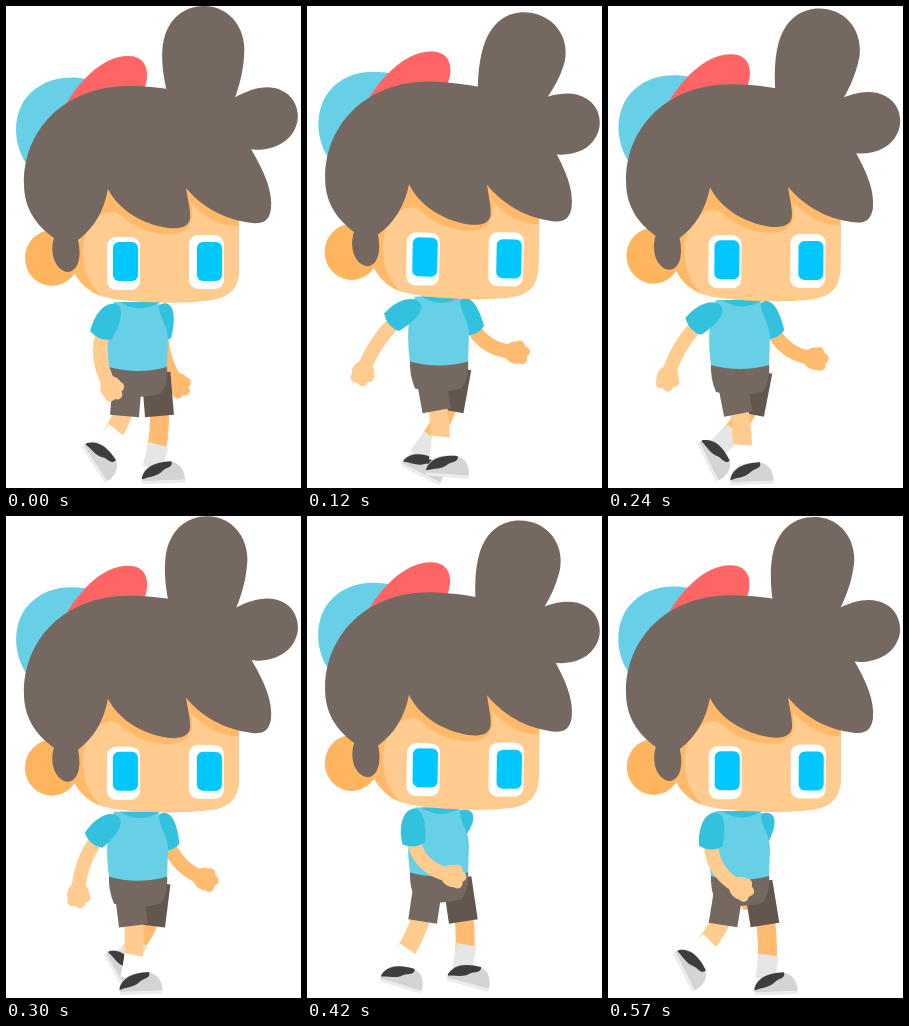
These frames come from a looping animation (295x482 px, 0.6 s). An HTML page with a canvas:

```html
<!DOCTYPE html>
<html lang="en">
<head>
<meta charset="utf-8">
<title>Walk cycle</title>
<style>
  html, body { margin: 0; width: 100%; height: 100%; overflow: hidden; background: #fff; }
  canvas { display: block; }
</style>
</head>
<body>
<canvas id="stage" width="295" height="482"></canvas>
<script>
const ctx = document.getElementById('stage').getContext('2d');
const LOOP = 600, STEPS = 15, RAD = Math.PI / 180;

const HAIR = '#756860', FAR_CLOTH = '#63564f', BLUE = '#67d0e6', TEAL = '#33c1e0';
const SKIN = '#ffcb8e', FAR_SKIN = '#ffbc70', EAR = '#ffb55e';

const shapes = Object.fromEntries(Object.entries({
  cap: 'M22 160C8 142 5 112 20 92C36 72 60 69 82 73L62 120Z',
  brim: 'M55 107C70 78 95 50 122 50C142 50 144 68 138 84L100 110Z',
  face: 'M66 225L100 172L185 170L233 200L233 262C233 280 226 291 205 294C180 298 120 298 92 289C66 277 58 250 66 225Z',
  glow: 'M77 246C77 224 90 206 106 206C116 206 122 222 150 227C178 232 190 222 185 197C200 213 216 221 233 220L233 262C233 280 226 291 205 294C180 297 120 298 95 290C82 278 77 262 77 246Z',
  hair: 'M48 232C28 218 18 200 18 178C17 125 58 79 125 80C160 80 200 90 228 95C236 115 240 130 245 143C258 165 267 185 265 203C263 216 256 218 246 217C218 214 195 200 180 182C182 195 185 205 184 213C182 222 172 223 162 222C135 218 112 203 102 183C98 205 88 222 72 234C76 252 72 265 62 266C50 265 43 248 48 232Z',
  bun: 'M166 105C159 82 155 62 156 44C158 14 177 0 198 0C220 0 237 18 238 42C238 62 234 78 226 100L215 125L180 125Z',
  lobe: 'M215 125L228 92C245 82 262 78 275 84C290 90 295 108 290 120C284 138 262 146 243 143L215 132Z',
  shirt: 'M108 296L153 296C152 312 162 318 162 334L161 361Q132 369 103 361C100 340 100 315 108 296Z',
  collar: 'M114 296L154 296Q134 309 114 296Z',
  shorts: 'M103 358L161 358C162 372 160 382 154 388Q132 394 108 388Q102 374 103 358Z',
  sleeve: 'M-13 23C-16 6 -11 -11 1 -12C11 -11 12 6 10 22Q0 29 -13 23Z',
  shoe: 'M-12 17C-12 2 0 -2 16 -2C27 -1 31 8 31 17Z',
  trim: 'M-12 13C-9 4 0 -2 18 -2C20 4 13 4 9 7C3 13 -4 12 -12 15Z',
  sole: 'M-12 17L31 17L31 20L-12 20Z'
}).map(([name, d]) => [name, new Path2D(d)]));

function fill(name, color) {
  ctx.fillStyle = color;
  ctx.fill(shapes[name]);
}

function curve(color, width, cap, x, y, cx, cy, ex, ey) {
  ctx.strokeStyle = color;
  ctx.lineWidth = width;
  ctx.lineCap = cap;
  ctx.beginPath();
  ctx.moveTo(x, y);
  ctx.quadraticCurveTo(cx, cy, ex, ey);
  ctx.stroke();
}

const line = (color, width, x, y, ex, ey) => curve(color, width, 'butt', x, y, x, y, ex, ey);

function disc(color, x, y, rx, ry = rx) {
  ctx.fillStyle = color;
  ctx.beginPath();
  ctx.ellipse(x, y, rx, ry, 0, 0, 7);
  ctx.fill();
}

function box(color, x, y, w, h, r) {
  ctx.fillStyle = color;
  ctx.beginPath();
  ctx.roundRect(x, y, w, h, r);
  ctx.fill();
}

// Runs draw() in a frame moved to (x, y) and turned by the angle
function at(x, y, angle, draw) {
  ctx.save();
  ctx.translate(x, y);
  ctx.rotate(angle);
  draw();
  ctx.restore();
}

const turnAbout = (x, y, angle, draw) => at(x, y, angle, () => { ctx.translate(-x, -y); draw(); });

// Cosine that peaks at the given step, so many times per loop
const wave = (step, peak, times = 1) => Math.cos(2 * Math.PI * times * (step - peak) / STEPS);

// The angle is in degrees, forward from hanging straight down
function arm(shoulder, y, angle, bend, skin) {
  const x = shoulder + angle * .05, sin = Math.sin(angle * RAD), cos = Math.cos(angle * RAD);
  const reach = 73 - .15 * angle, sag = bend + .13 * angle;
  const hx = x + reach * sin, hy = y + reach * cos;
  const ex = x + reach / 2 * sin - sag * cos, ey = y + reach / 2 * cos + sag * sin;
  curve(skin, 14, 'round', x, y, 2 * ex - (x + hx) / 2, 2 * ey - (y + hy) / 2, hx, hy);
  at(hx, hy, Math.atan2(hy - ey, hx - ex), () => {
    disc(skin, 0, 0, 12, 11);
    disc(skin, 8, -4, 5);
    disc(skin, 8, 4, 5);
    disc(skin, 1, -8, 5);
  });
  at(x, y, Math.atan2(x - ex, ey - y) + 6 * RAD, () => fill('sleeve', TEAL));
}

function leg(hip, y, step, skin, sock, cloth) {
  const stride = wave(step, 4.6);
  const hx = hip + 10 * stride, hy = y + 43;
  const ax = hip - 13 + 30 * stride, ay = 449 + 10 * wave(step, 6.4);
  const turn = Math.max(-2, 16 + 48 * wave(step, 13.7));
  const kx = (hx + ax) / 2 + 4, ky = (hy + ay) / 2 - 2;
  const d = Math.hypot(kx - ax, ky - ay), ux = (kx - ax) / d, uy = (ky - ay) / d;
  curve(skin, 19, 'butt', hx, hy - 8, kx, ky, ax, ay);
  line(sock, 20, ax + ux * 20, ay + uy * 20, ax - ux * 4, ay - uy * 4);
  at(ax, ay, turn * RAD, () => {
    fill('shoe', '#d4d4d4');
    fill('trim', '#3e3c3c');
    fill('sole', '#ececec');
  });
  line(cloth, 29, hip, y, hx, hy);
}

function head(lift, lean) {
  ctx.save();
  ctx.translate(0, -4 * lift);
  turnAbout(160, 185, .0235 * lift, () => {
    fill('cap', BLUE);
    fill('brim', '#ff6565');
    disc(EAR, 46, 252, 27, 28);
    fill('face', '#ffb968');
    fill('glow', SKIN);
    box('#fff', 101, 231, 33, 53, 9);
    box('#fff', 183, 229, 35, 54, 9);
    for (const x of [107, 191]) box('#00c8ff', x, 236, 25, 39, 6);
    fill('hair', HAIR);
    turnAbout(200, 110, lean * .45 * RAD, () => fill('lobe', HAIR));
    at(200, 110, lean * RAD, () => {
      ctx.scale(1, 1 - .07 * lift);
      ctx.translate(-200, -110);
      fill('bun', HAIR);
    });
  });
  ctx.restore();
}

function draw(step) {
  const lift = .5 - .5 * wave(step, 0, 2);
  const lean = 10.5 + 11 * wave(step, 4.2, 2);
  const swing = 46 * wave(step, 11.7) + 8 * wave(step, 11.7, 2) - 1;
  const dy = -6 * lift;
  ctx.fillStyle = '#fff';
  ctx.fillRect(0, 0, 295, 482);
  arm(157, 309 + dy, 12 - swing, 6, FAR_SKIN);
  leg(150, 367 + dy, step + STEPS / 2, FAR_SKIN, '#e6e6e6', FAR_CLOTH);
  leg(122, 367 + dy, step, SKIN, '#fff', HAIR);
  at(0, dy, 0, () => {
    fill('shorts', HAIR);
    fill('shirt', BLUE);
    fill('collar', TEAL);
  });
  arm(105, 309 + dy, swing, 11, SKIN);
  head(lift, lean);
}

// Every 120 ms holds three steps, the first one for 60 ms
function stepAt(ms) {
  const t = ms % LOOP;
  return 3 * Math.floor(t / 120) + Math.max(0, Math.floor(t % 120 / 30) - 1);
}

let start;
function tick(now) {
  start ??= now;
  draw(stepAt(now - start));
  requestAnimationFrame(tick);
}
requestAnimationFrame(tick);
</script>
</body>
</html>
```
